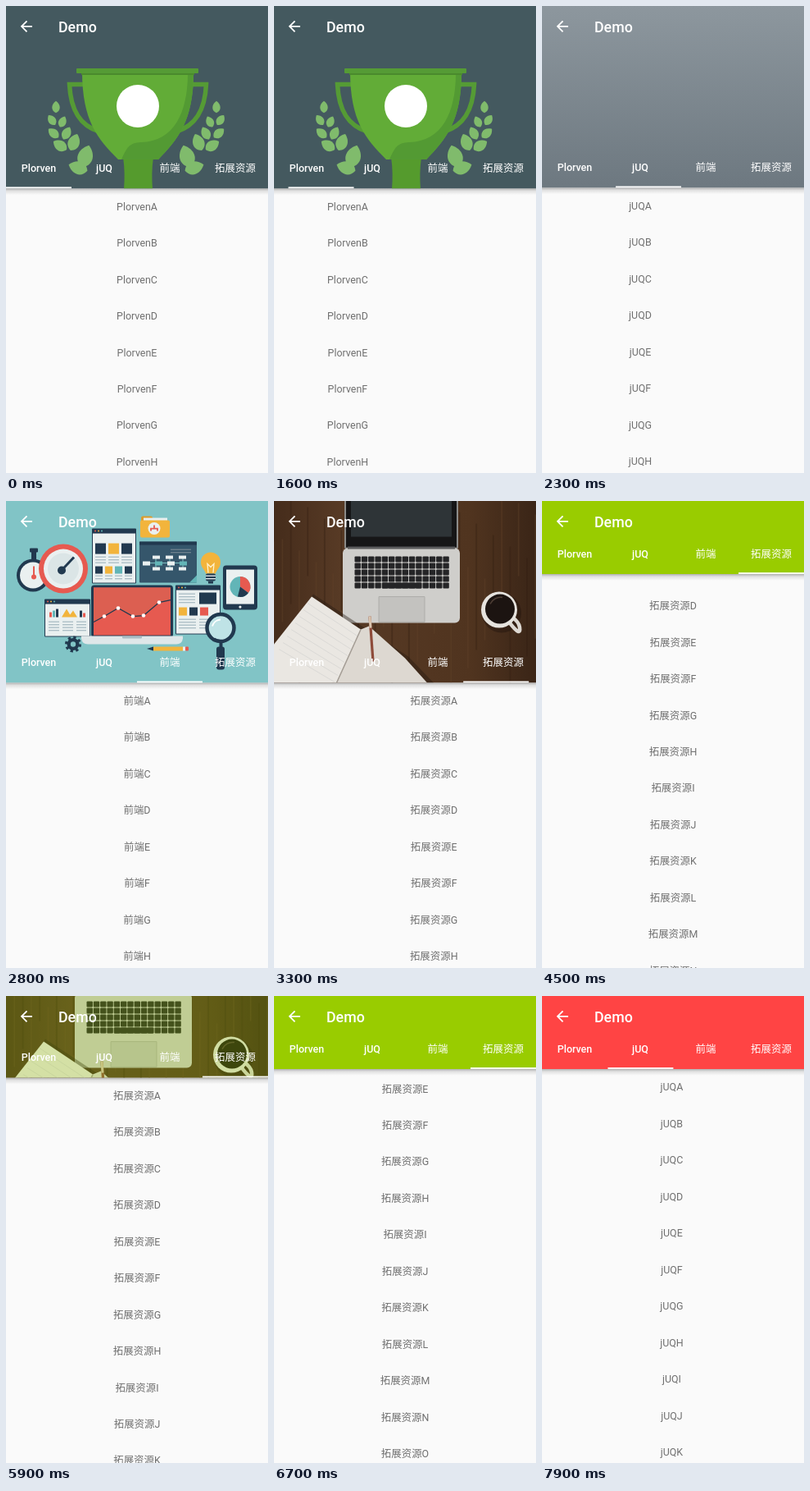
An HTML page for the animation above (8000 ms loop, 320 by 569 pixels).

```html
<!DOCTYPE html>
<html lang="zh">
<head>
<meta charset="utf-8">
<title>Demo</title>
<style>
  html, body { margin: 0; width: 100%; height: 100%; overflow: hidden; background: #fafafa; }
  svg { display: block; width: 100%; height: 100%; }
  text { font-family: Roboto, "Noto Sans CJK SC", "Noto Sans CJK", sans-serif; font-size: 12.44px; }
  .row { fill: #707070; text-anchor: middle; }
  .tab { fill: #fff; text-anchor: middle; font-weight: 500; }
  .cjk { font-weight: 400; }
  .title { fill: #fff; font-size: 17.8px; font-weight: 500; }
</style>
</head>
<body>
<svg id="stage" viewBox="0 0 320 569"></svg>
<script>
const LOOP = 8000, STEP = 100, W = 320, FULL = 222.2, ROW = 44.45;
const TABS = ["Plorven", "jUQ", "前端", "拓展资源"];
const COLORS = ["#33b5e5", "#ff4444", "#ffbb33", "#99cc00"];

// Shape helpers
const rect = (x, y, w, h, fill, rx = 0) =>
  `<rect x="${x}" y="${y}" width="${w}" height="${h}" rx="${rx}" fill="${fill}"/>`;
const circle = (x, y, r, fill, more = "") =>
  `<circle cx="${x}" cy="${y}" r="${r}" fill="${fill}" ${more}/>`;
const path = (d, fill, more = "") => `<path d="${d}" fill="${fill}" ${more}/>`;
const line = (d, color, width, more = "") =>
  path(d, "none", `stroke="${color}" stroke-width="${width}" ${more}`);
const repeat = (n, draw) => Array.from({ length: n }, (_, i) => draw(i)).join("");

function trophy() {
  const leaf = (x, y, angle, s) => path("M0 -8C7 -3 7 5 0 8C-7 5 -7 -3 0 -8Z", "#80bb6c",
    `transform="translate(${x} ${y}) rotate(${angle}) scale(${s})"`);
  const sprig = leaf(61, 123, 0, .9) + leaf(56, 139, -35, .9) + leaf(69, 141, 25, .9) +
    leaf(58, 155, -50, 1) + leaf(74, 155, 28, 1.05) + leaf(66, 170, -58, 1.2) +
    leaf(83, 166, 22, 1.35) + leaf(97, 183, 18, 1.75) + leaf(88, 197, -72, 1.5);
  const handle = line("M98 95.5H77.5C79 128 91 146 114 153", "#559b35", 5.5);
  return rect(0, 0, W, 223, "#44595f") +
    sprig + `<g transform="matrix(-1 0 0 1 318 0)">${sprig}</g>` +
    handle + `<g transform="matrix(-1 0 0 1 322 0)">${handle}</g>` +
    path("M143 184H180C178 198 178 210 179 223H144C145 210 145 198 143 184Z", "#559b2d") +
    path("M93 80H229C229 140 210 162 186 187H137C112 162 93 140 93 80Z", "#62ac37") +
    path("M222 82H229C229 140 210 162 186 187H141C148 172 150 167 165 166C205 165 222 130 222 82Z", "#539a33") +
    rect(86, 76, 149, 6, "#559b35", 1) + rect(92, 82, 138, 2, "#4a8a2d") +
    circle(161, 122, 26, "#fff");
}

function plain() {
  return rect(0, 0, W, 223, "url(#mist)");
}

function devices() {
  const dark = "#21394f", red = "#e65a50", pale = "#eaf0f0", gold = "#f2b43c", teal = "#62b5b7";
  const page = (x, y, w, h) => rect(x, y, w, h, dark, 1) + rect(x + 1, y + 6, w - 2, h - 7, pale) +
    repeat(3, i => circle(x + 4 + i * 4, y + 3, 1, [red, gold, teal][i]));
  const lines = (x, y, w, n, color = "#a9bcc4") =>
    repeat(n, i => rect(x, y + i * 3.5, w, 1.3, color));
  const dots = [[120, 141], [137, 131], [155, 141], [168, 140], [187, 124]];
  const trend = dots.map(d => d.join(" ")).join("L");
  return rect(0, 0, W, 223, "#81c4c6") +
    // folder
    rect(165, 19, 14, 8, "#dc9c2c", 2) + rect(168, 21, 29, 10, pale) + rect(164, 24, 36, 21, gold, 2) +
    circle(181, 34, 7.5, pale) + line("M177 37V34H185V37M181 34V30", red, 1.8) +
    // stopwatch and clock
    rect(29, 58, 10, 5, dark, 1) + rect(31, 62, 6, 10, dark) + circle(33, 91, 20, dark) +
    circle(33, 91, 16, pale) + line("M34 93V80", red, 2) + circle(34, 93, 3, red) +
    circle(70, 83, 30, red) + circle(70, 83, 24, pale) + circle(70, 83, 19, "#dbe5e6") +
    line("M65 88L83 69", dark, 3) + circle(68, 85, 5, dark) +
    // pages
    page(105, 34, 54, 67) +
    repeat(3, i => rect(109 + i * 16, 52, 13, 13, i == 1 ? gold : dark) +
      lines(109 + i * 16, 68, 13, 3)) +
    repeat(4, i => rect(109 + i * 12, 80, 9, 9, [dark, gold, teal, dark][i]) + lines(109 + i * 12, 91, 9, 2)) +
    rect(163, 50, 70, 50, "#35566b", 1) + rect(163, 50, 70, 4, dark) +
    path("M233 91V100H224Z", teal) +
    line("M173 76H220M183 70V82M200 70V82M216 70V82", "#81c4c6", 1) +
    repeat(4, i => rect(167 + i * 15, 74, 9, 5, i % 2 ? teal : pale)) +
    repeat(3, i => rect(179 + i * 16, 67, 9, 4, pale) + rect(179 + i * 16, 81, 9, 4, pale)) +
    lines(201, 59, 25, 2, "#70828f") +
    page(47, 120, 56, 46) + path("M68 142L74 132L80 142ZM76 142L82 134L87 142Z", gold) +
    repeat(3, i => rect(53 + i * 4, 136 - i * 2, 3, 6 + i * 2, [red, teal, dark][i])) +
    repeat(2, i => rect(90 + i * 4, 134 + i * 3, 3, 8 - i * 3, i ? red : dark)) +
    lines(52, 147, 13, 4) + lines(69, 147, 13, 4) + lines(86, 147, 12, 4) +
    page(207, 103, 55, 60) + lines(211, 113, 20, 4) + rect(236, 112, 21, 14, dark) +
    rect(211, 130, 10, 10, gold) + rect(224, 130, 10, 10, dark) + rect(237, 130, 10, 10, red) +
    lines(211, 144, 21, 4) + lines(236, 144, 15, 4) +
    // bulb
    path("M244 89C243 84 238 82 238 75A12 12 0 0 1 262 75C262 82 257 84 256 89Z", gold) +
    line("M247 88L246 77L250 81L254 77L253 88", "#fff3cf", 1.3) + rect(244, 89, 12, 9, dark, 2) +
    rect(247, 98, 6, 3, dark) + lines(244, 91, 12, 2, pale) +
    // tablet
    rect(265, 79, 42, 54, dark, 4) + rect(269, 84, 34, 42, pale) + circle(286, 129.5, 1.6, pale) +
    circle(286, 105, 12.5, teal) + path("M286 105V92.5A12.5 12.5 0 0 1 296 112.5Z", red) +
    path("M286 105L296 112.5A12.5 12.5 0 0 1 283 117Z", dark) +
    // laptop
    rect(104, 103, 100, 64, dark, 4) + rect(107, 106, 94, 58, red) +
    path(`M107 106H201V121L${[...dots].reverse().map(d => d.join(" ")).join("L")}L107 148Z`, "#dc5f51") +
    line(`M107 148L${trend}L201 121`, dark, 1.3) +
    dots.map(([x, y]) => circle(x, y, 2.3, "#fff")).join("") +
    path("M92 165H216V168Q215 175 208 175H100Q93 175 92 168Z", "#dfe7e9") +
    rect(142, 165, 24, 3, "#a9bcc4", 1) +
    // gear, pencil, magnifier
    circle(82, 175, 7.5, dark) +
    circle(82, 175, 8, "none", `stroke="${dark}" stroke-width="4" stroke-dasharray="3.1 3.18"`) +
    circle(82, 175, 3.2, "#81c4c6") +
    path("M172 180.5L180 178V183Z", dark) + rect(180, 178, 36, 5, gold) +
    rect(216, 178, 3, 5, pale) + rect(219, 178, 4, 5, red, 1) +
    rect(260.5, 170, 4, 12, dark) + rect(257, 178, 10, 28, dark, 3) +
    circle(262, 155, 16.5, "#bfe3e6", `stroke="${dark}" stroke-width="4.5"`) +
    line("M252 153A11 11 0 0 1 262 145", "#fff", 2);
}

function desk() {
  const key = (row, i) => rect(98.5 + i * 8.3, 68 + row * 8, 7.4, 6.9, "#252527", 1);
  return rect(0, 0, W, 223, "url(#wood)") +
    repeat(32, i => line(`M${i * 10.3} ${(i * 67) % 120 - 20}v${70 + (i * 31) % 110}`,
      i % 2 ? "#60412a" : "#332013", 1.8, 'opacity=".4"')) +
    // laptop
    rect(86, -6, 139, 66, "#8b8b89", 4) + rect(88, -6, 135, 63, "#161617") +
    rect(94, -6, 123, 50, "#2e3437") + rect(84, 58, 143, 91, "#cfcecb", 6) +
    rect(90, 56, 131, 3, "#5c5c5d") +
    repeat(5, row => repeat(14, i => key(row, i))) + rect(132, 100, 48, 6.9, "#252527", 1) +
    rect(128, 117, 56, 31, "#c3c2bf", 2) + line("M128 117H184V148H128Z", "#a8a7a4", .8) +
    // notebook and pen
    path("M48 114L112 156L164 190L196 223H-6V188Z", "#211711", 'opacity=".4"') +
    path("M46 117L106 157L76 223H0V175Z", "#eae7e2") +
    path("M106 157L116 153L160 192L188 223H76Z", "#ddd8d1") +
    repeat(8, i => line(`M${41 - i * 5} ${125 + i * 8}L${102 - i * 4} ${165 + i * 8}`, "#cfcecd", .6)) +
    line("M106 157L76 223", "#a49d95", 1.5) +
    line("M117 141L121 196", "#8e4b3a", 3.2) + line("M117 141L118 155", "#d8c3ae", 3) +
    // cup
    circle(278, 137, 24, "#1d110a", 'opacity=".4"') +
    line("M288 149Q302 167 300 154Q299 148 291 142", "#ddd8d2", 4.5) +
    circle(275, 133, 22, "#e6e3de") + circle(276, 132, 18, "#1c1411") +
    line("M264 126A14 14 0 0 1 279 118", "#4d3d34", 1.5);
}

const tabX = i => 40 + i * 80;
const stage = document.getElementById("stage");
stage.innerHTML = `
  <defs>
    <linearGradient id="mist" x2="0" y2="1"><stop stop-color="#8d979e"/><stop offset="1" stop-color="#6d7880"/></linearGradient>
    <linearGradient id="wood"><stop stop-color="#452c1b"/><stop offset=".25" stop-color="#573a25"/><stop offset=".75" stop-color="#50341f"/><stop offset="1" stop-color="#3a2517"/></linearGradient>
    <linearGradient id="shade" x2="0" y2="1"><stop stop-opacity=".3"/><stop offset=".4" stop-opacity=".1"/><stop offset="1" stop-opacity="0"/></linearGradient>
    <clipPath id="clip"><rect id="window" width="320"/></clipPath>
  </defs>
  <rect width="320" height="569" fill="#fafafa"/>
  ${TABS.map((name, i) => `<g class="page">${repeat(26, k =>
    `<text class="row" x="160" y="${26.6 + k * ROW}">${name}${String.fromCharCode(65 + k)}</text>`)}</g>`).join("")}
  <rect id="shadow" width="320" height="8" fill="url(#shade)"/>
  <g clip-path="url(#clip)">
    <g id="pictures">${[trophy, plain, devices, desk].map(draw => `<g class="picture">${draw()}</g>`).join("")}</g>
    <rect id="scrim" width="320" height="223"/>
  </g>
  <g id="tabs">
    ${TABS.map((name, i) => `<text class="tab ${i > 1 ? "cjk" : ""}" x="${tabX(i)}" y="-20.2">${name}</text>`).join("")}
    <rect id="marker" y="-1.8" width="80" height="1.8" fill="#fff"/>
  </g>
  <path transform="translate(14.2 14.2) scale(.889)" fill="#fff" d="M20 11H7.83l5.59-5.59L12 4l-8 8 8 8 1.41-1.41L7.83 13H20v-2z"/>
  <text class="title" x="64" y="32.3">Demo</text>`;

const get = id => document.getElementById(id);
const shadow = get("shadow"), clipWindow = get("window"), pictureBox = get("pictures"),
  scrim = get("scrim"), tabs = get("tabs"), marker = get("marker");
const pages = [...document.querySelectorAll(".page")];
const pictures = [...document.querySelectorAll(".picture")];

// Keys are [time, value]
const POSITION = [[1500, 0], [1600, .219], [1700, .5], [1800, .78], [1900, .95], [2000, 1],
  [2200, 1], [2400, 1.25], [2600, 1.78], [2800, 2], [2900, 2], [3000, 2.15], [3200, 2.78], [3400, 3],
  [6700, 3], [6900, 2.75], [7100, 2.3], [7400, 2], [7600, 2], [7700, 1.7], [7800, 1.15], [7900, 1.005]];
const HEIGHT = [[2200, FULL], [2300, 221.3], [3500, 221.3], [3600, 204], [3800, 147.4], [4000, 102], [4100, 88.9],
  [5800, 88.9], [5900, 99.4], [6000, 124], [6100, 126], [6300, 88.9]];
const SCROLL = [[4100, 0], [4400, 100], [4700, 150], [4800, 150], [5200, 0], [6200, 0], [6500, 140], [6700, 175.7]];
const SCRIM = [[3900, 0], [4200, .35], [4500, 1], [5800, 1], [5900, .27], [6000, .12], [6100, .12], [6300, .4], [6600, 1]];
const SELECT = [[0, 0], [1700, 1], [2500, 2], [3100, 3], [7000, 2], [7700, 1]];

function at(keys, t) {
  const n = keys.findIndex(k => k[0] > t);
  if (n < 0) return keys[keys.length - 1][1];
  if (n === 0) return keys[0][1];
  const [t0, a] = keys[n - 1], [t1, b] = keys[n];
  return a + (b - a) * (t - t0) / (t1 - t0);
}

const move = (el, x, y) => el.setAttribute("transform", `translate(${x} ${y})`);

function render(time) {
  const t = Math.floor(time % LOOP / STEP) * STEP;
  const pos = at(POSITION, t), height = at(HEIGHT, t), scroll = at(SCROLL, t);
  const n = SELECT.filter(s => s[0] <= t).length - 1;
  const [since, tab] = SELECT[n], last = n ? SELECT[n - 1][1] : tab;
  const fade = n ? Math.min(1, (t - since + STEP) / 300) : 1;

  pages.forEach((page, i) => move(page, (i - pos) * W, height - (i === 3 ? scroll : 0)));
  pictures.forEach((picture, i) => {
    const seen = i === tab || (i === last && fade < 1);
    picture.setAttribute("display", seen ? "inline" : "none");
    picture.setAttribute("opacity", i === tab ? fade : 1 - fade * .5);
  });
  move(pictureBox, 0, (height - FULL) / 2);
  clipWindow.setAttribute("height", height);
  scrim.setAttribute("fill", COLORS[tab]);
  scrim.setAttribute("opacity", at(SCRIM, t));
  move(shadow, 0, height);
  move(tabs, 0, height);
  marker.setAttribute("x", pos * 80);
}

const start = performance.now();
function tick() {
  render(performance.now() - start);
  requestAnimationFrame(tick);
}
tick();
</script>
</body>
</html>
```
